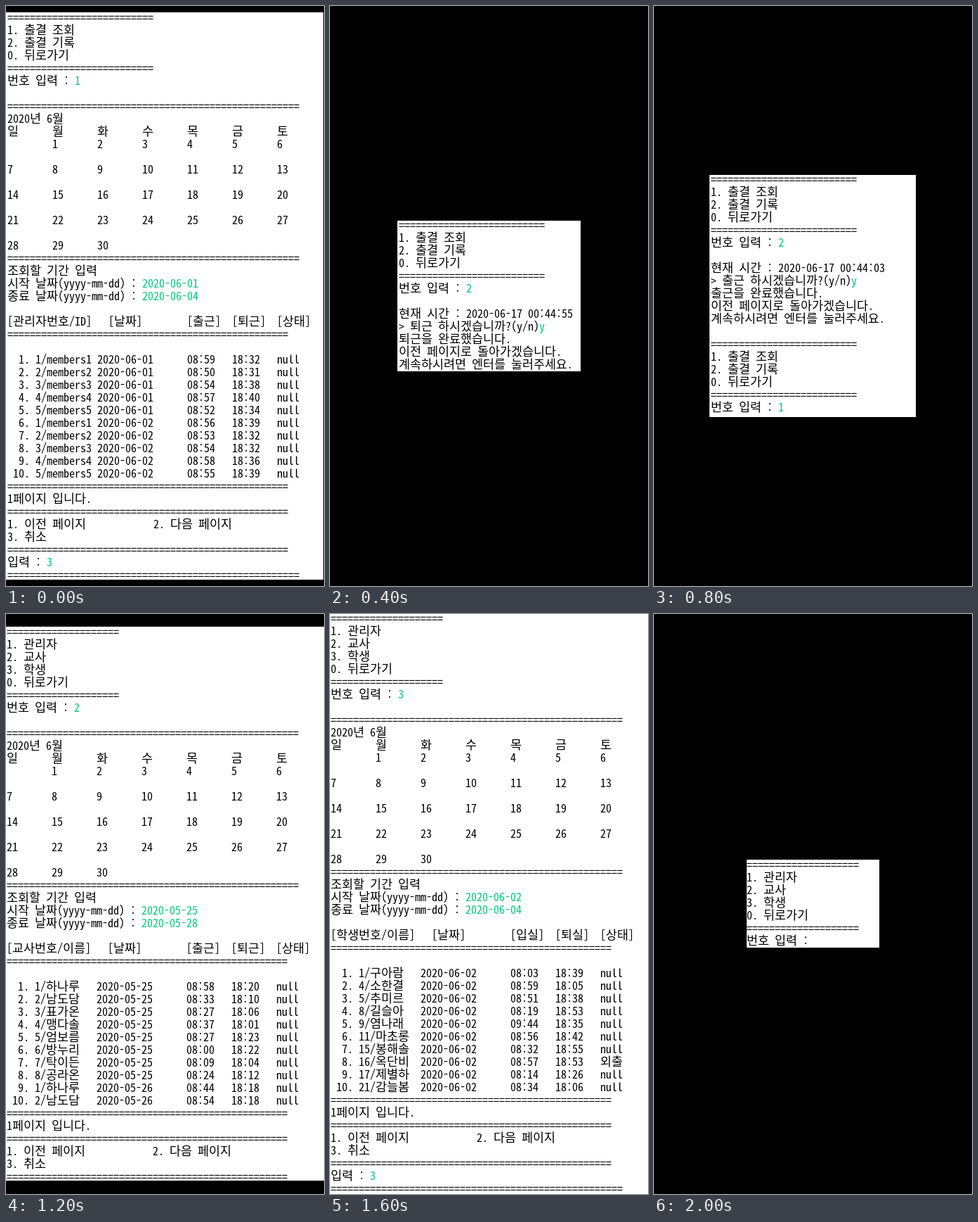
Write an HTML page that moves like this. It is 453 px wide and 824 px high and loops after 2.4 s.

```html
<!DOCTYPE html>
<html lang="ko">
<head>
<meta charset="utf-8">
<title>출결 콘솔</title>
<style>
  html, body { margin: 0; width: 100%; height: 100%; overflow: hidden; background: #000; }
  .screen {
    position: absolute; inset: 0; overflow: hidden; background: #000; visibility: hidden;
    animation: show 2.4s step-end infinite;
  }
  .panel { position: absolute; overflow: hidden; background: #fff; }
  pre {
    position: absolute; margin: 0; color: #000; tab-size: 8;
    font: 16px/18px "Noto Sans Mono CJK KR", "Noto Sans Mono CJK JP", "Noto Sans CJK KR", "Noto Sans CJK", monospace;
    font-variant-ligatures: none;
  }
  pre b { font-weight: inherit; color: #00c87d; }
  /* Hangul advances 0.92em, so this size makes a syllable two Latin cells wide. */
  pre i { font-style: normal; font-size: calc(1em / 0.92); line-height: 0; }
  @keyframes show {
    0% { visibility: visible; }
    16.666%, 100% { visibility: hidden; }
  }
</style>
</head>
<body>
<script>
const rule = n => '='.repeat(n);
const gap = n => ' '.repeat(n);
const lines = (...parts) => parts.flat().join('\n');

// Text in braces is what the user typed.
const menu = (width, items, choice) => [rule(width), ...items, rule(width), `번호 입력 : ${choice}`];
const recordMenu = choice => menu(26, ['1. 출결 조회', '2. 출결 기록', '0. 뒤로가기'], choice);
const roleMenu = choice => menu(20, ['1. 관리자', '2. 교사', '3. 학생', '0. 뒤로가기'], choice);

function calendar() {
  const weeks = [];
  for (let sunday = 0; sunday <= 28; sunday += 7) {
    const days = Array.from({ length: 7 }, (_, i) => sunday + i);
    weeks.push(days.map(d => d > 0 && d <= 30 ? d : '').join('\t'), '');
  }
  weeks.pop();
  return [rule(52), '2020년 6월', [...'일월화수목금토'].join('\t'), ...weeks, rule(52)];
}

function table(heading, [arrive, leave], from, to, records) {
  const rows = records.map((record, i) => {
    const [id, date, start, end, state = 'null'] = record.split(' ');
    return `${String(i + 1).padStart(3)}. ${id}\t2020-${date}\t${start}\t${end}\t${state}`;
  });
  return [
    '조회할 기간 입력',
    `시작 날짜(yyyy-mm-dd) : {2020-${from}}`,
    `종료 날짜(yyyy-mm-dd) : {2020-${to}}`,
    '',
    `[${heading}]${gap(3)}[날짜]${gap(8)}[${arrive}]${gap(2)}[${leave}]${gap(2)}[상태]`,
    rule(50), '', ...rows, rule(50),
    '1페이지 입니다.',
    rule(50),
    `1. 이전 페이지${gap(12)}2. 다음 페이지`,
    '3. 취소',
    rule(50)
  ];
}

const cancel = ['입력 : {3}', rule(52)];

const clock = (action, time) => [
  '', `현재 시간 : 2020-06-17 ${time}`,
  `&gt; ${action} 하시겠습니까?(y/n){y}`,
  `${action}을 완료했습니다.`,
  '이전 페이지로 돌아가겠습니다.',
  '계속하시려면 엔터를 눌러주세요.'
];

// box: left, top, width, height of the white panel; at: text origin on the stage
const screens = [
  {
    box: [0, 9, 452, 806], at: [2, 6],
    text: lines(recordMenu('{1}'), '', calendar(),
      table('관리자번호/ID', ['출근', '퇴근'], '06-01', '06-04', [
        '1/members1 06-01 08:59 18:32',
        '2/members2 06-01 08:50 18:31',
        '3/members3 06-01 08:54 18:38',
        '4/members4 06-01 08:57 18:40',
        '5/members5 06-01 08:52 18:34',
        '1/members1 06-02 08:56 18:39',
        '2/members2 06-02 08:53 18:32',
        '3/members3 06-02 08:54 18:32',
        '4/members4 06-02 08:58 18:36',
        '5/members5 06-02 08:55 18:39'
      ]), cancel)
  },
  {
    box: [96, 305, 261, 214], at: [98, 301],
    text: lines(recordMenu('{2}'), clock('퇴근', '00:44:55'))
  },
  {
    box: [79, 240, 294, 344], at: [81, 236],
    text: lines(recordMenu('{2}'), clock('출근', '00:44:03'), '', recordMenu('{1}'))
  },
  {
    box: [0, 18, 453, 787], at: [1, 15],
    text: lines(roleMenu('{2}'), '', calendar(),
      table('교사번호/이름', ['출근', '퇴근'], '05-25', '05-28', [
        '1/하나루 05-25 08:58 18:20',
        '2/남도담 05-25 08:33 18:10',
        '3/표가온 05-25 08:27 18:06',
        '4/맹다솔 05-25 08:37 18:01',
        '5/엄보름 05-25 08:27 18:23',
        '6/방누리 05-25 08:00 18:22',
        '7/탁이든 05-25 08:09 18:04',
        '8/공라온 05-25 08:24 18:12',
        '1/하나루 05-26 08:44 18:18',
        '2/남도담 05-26 08:54 18:18'
      ]))
  },
  {
    box: [0, 0, 453, 824], at: [1, -4],
    text: lines(roleMenu('{3}'), '', calendar(),
      table('학생번호/이름', ['입실', '퇴실'], '06-02', '06-04', [
        '1/구아람 06-02 08:03 18:39',
        '4/소한결 06-02 08:59 18:05',
        '5/추미르 06-02 08:51 18:38',
        '8/길슬아 06-02 08:19 18:53',
        '9/염나래 06-02 09:44 18:35',
        '11/마초롱 06-02 08:56 18:42',
        '15/봉해솔 06-02 08:32 18:55',
        '16/옥단비 06-02 08:57 18:53 외출',
        '17/제별하 06-02 08:14 18:26',
        '21/감늘봄 06-02 08:34 18:06'
      ]), cancel)
  },
  {
    box: [132, 349, 189, 125], at: [132, 346],
    text: lines(roleMenu(''))
  }
];

const markUp = text => text
  .replace(/[가-힣]+/g, '<i>$&</i>')
  .replace(/\{(.*?)\}/g, '<b>$1</b>');

document.body.innerHTML = screens.map(({ box: [x, y, w, h], at: [tx, ty], text }, i) => `
  <div class="screen" style="animation-delay:${i * 400}ms">
    <div class="panel" style="left:${x}px;top:${y}px;width:${w}px;height:${h}px">
      <pre style="left:${tx - x}px;top:${ty - y}px">${markUp(text)}</pre>
    </div>
  </div>`).join('');
</script>
</body>
</html>
```
